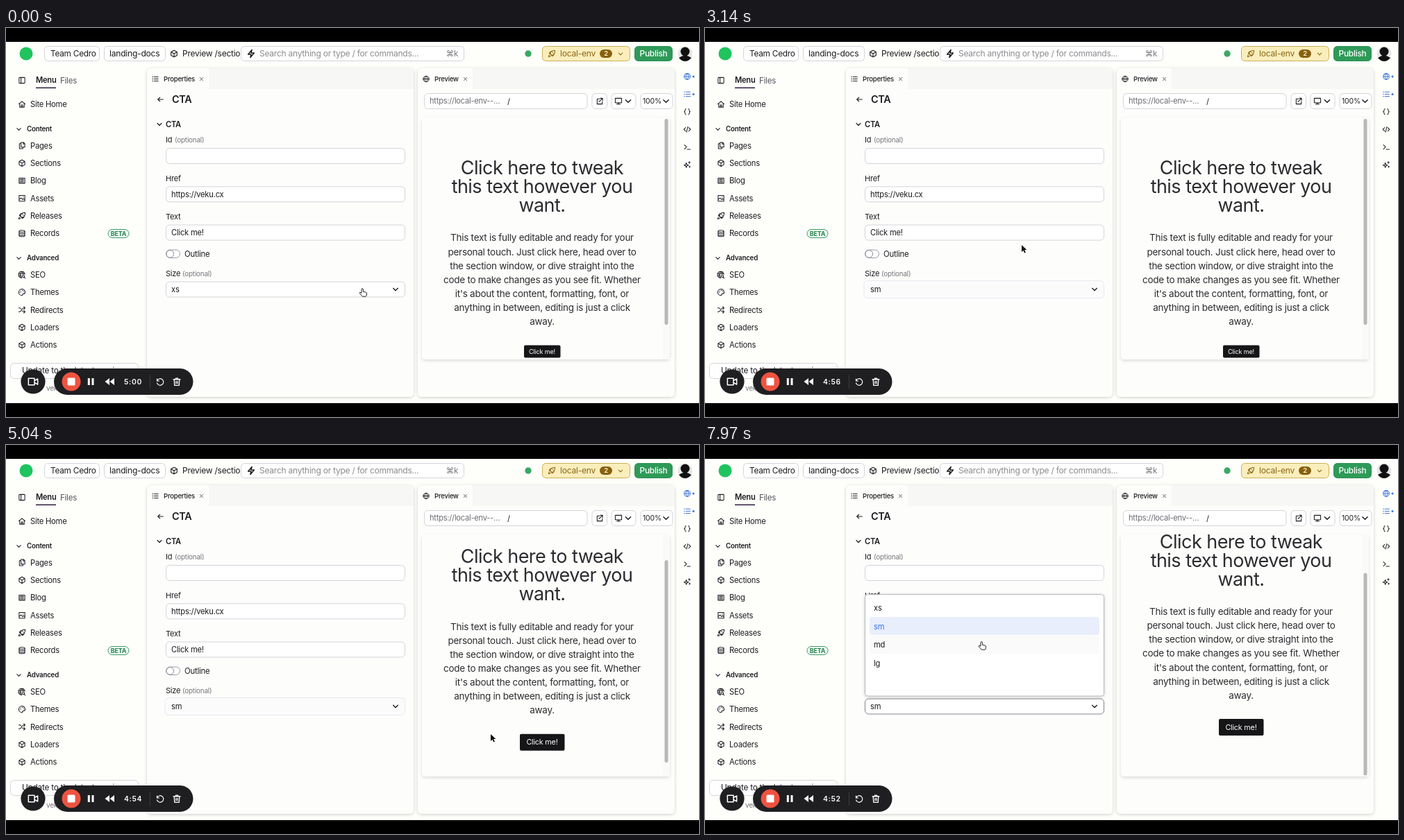
Animation of 998x561 px, one loop 8000 ms. Source, as an HTML page:

```html
<!DOCTYPE html>
<html lang="en">
<head>
<meta charset="utf-8">
<title>Button size settings</title>
<style>
  html, body { margin: 0; width: 100%; height: 100%; overflow: hidden; background: #000; }
  svg { display: block; width: 998px; height: 561px; }
  text { font-family: Inter, "Open Sans", sans-serif; letter-spacing: -.02em; white-space: pre; }
  .clock { letter-spacing: .06em; }
</style>
</head>
<body>
<svg id="stage" viewBox="0 0 998 561" xmlns="http://www.w3.org/2000/svg"></svg>
<script>
const INK = '#1c1c20', GRAY = '#75757c', LINE = '#d3d4da', BLUE = '#3a72e0', DARK = '#1f1e21';
const PAPER = '#fefefb', PANEL = '#fdfdfb';
const LOOP = 8000;

// Line icons on a 24 x 24 grid
const ICONS = {
  cube: 'M12 2l9 5v10l-9 5-9-5V7zM3 7l9 5 9-5M12 12v10',
  globe: 'M2 12a10 10 0 1 0 20 0a10 10 0 1 0-20 0M2 12h20M12 2c-6 6-6 14 0 20c6-6 6-14 0-20',
  panel: 'M5 3h14a2 2 0 0 1 2 2v14a2 2 0 0 1-2 2H5a2 2 0 0 1-2-2V5a2 2 0 0 1 2-2zM9 3v18',
  home: 'M2 11l10-8 10 8M5 9v12h14V9M10 21v-7h4v7',
  pages: 'M9 2h8l4 4v11H9zM16 2v5h5M9 6H4v16h11v-5',
  blog: 'M3 4h18v16H3zM7 8h10M7 12h10M7 16h10M3 8h1M3 12h1M3 16h1',
  image: 'M3 3h18v18H3zM3 16l6-5 5 5 3-3 4 4M15 8h1',
  rocket: 'M9 15l-4-4c3-6 9-9 17-9 0 8-3 14-9 17zM9 11H4l3-5h5M13 15v5l5-3v-5M5 16c-3 1-3 6-3 6s5 0 6-3M15 8v1',
  data: 'M3 5c0-4 18-4 18 0s-18 4-18 0v14c0 4 18 4 18 0V5M3 10c0 4 18 4 18 0M3 15c0 4 18 4 18 0',
  seo: 'M21 10a10 10 0 1 0-10 12M2 9h19M2 15h8M12 2c-6 6-6 14-1 20M12 2c3 3 4 5 4 8M13 17a3.5 3.5 0 1 0 7 0a3.5 3.5 0 1 0-7 0M19 20l3 3',
  palette: 'M12 2a10 10 0 0 0 0 20c3 0 2-3 2-4 0-3 8 1 8-6 0-6-5-10-10-10zM7 12h.5M8 8h.5M13 6h.5M17 9h.5',
  shuffle: 'M2 18h3c5 0 7-12 12-12h5M18 2l4 4-4 4M2 6h3c2 0 3 1 4 3M13 15c1 2 2 3 4 3h5M18 14l4 4-4 4',
  down: 'M4 8l8 8 8-8', back: 'M21 12H3M10 5l-7 7 7 7', close: 'M5 5l14 14M19 5L5 19',
  list: 'M8 5h14M8 12h14M8 19h14M2 5h2M2 12h2M2 19h2',
  zap: 'M14 2L4 14h8l-2 8 10-12h-8z',
  external: 'M14 3h7v7M21 3L10 14M11 5H4v16h16v-8',
  monitor: 'M2 3h20v14H2zM12 17v4M7 21h10',
  braces: 'M8 3C2 3 8 12 2 12c6 0 0 9 6 9M16 3c6 0 0 9 6 9-6 0 0 9-6 9',
  code: 'M7 6l-6 6 6 6M17 6l6 6-6 6M14 3l-4 18', terminal: 'M3 5l7 7-7 7M12 20h10',
  sparkles: 'M9 6l2 6 6 2-6 2-2 6-2-6-6-2 6-2zM19 2v6M16 5h6M20 17v4M18 19h4',
  camera: 'M2 5h13v14H2zM15 10l7-4v12l-7-4',
  undo: 'M3 4v6h6M3 10a9.5 9.5 0 1 1 0 6',
  trash: 'M3 6h18M9 6V3h6v3M5 6l1 16h12l1-16M10 11v6M14 11v6'
};

const icon = (name, x, y, size = 11, color = INK, weight = 2.3) =>
  `<path d="${ICONS[name]}" transform="translate(${x - size / 2} ${y - size / 2}) scale(${size / 24})"
    fill="none" stroke="${color}" stroke-width="${weight}" stroke-linejoin="round" stroke-linecap="round"/>`;

const chevron = (x, y, size, color = INK) => icon('down', x, y, size, color, 3.2);

// y is the vertical middle of the line
const text = (x, y, str, size = 11.2, o = {}) =>
  `<text x="${x}" y="${y + size * .36}" font-size="${size}" fill="${o.fill || INK}"
    font-weight="${o.weight || 400}" text-anchor="${o.anchor || 'start'}" ${o.attr || ''}>${str}</text>`;

const box = (x1, y1, x2, y2, r = 5, fill = '#fff', stroke = LINE, attr = '') =>
  `<rect x="${x1}" y="${y1}" width="${x2 - x1}" height="${y2 - y1}" rx="${r}" fill="${fill}" stroke="${stroke}" ${attr}/>`;

const dot = (x, y, r, fill) => `<circle cx="${x}" cy="${y}" r="${r}" fill="${fill}"/>`;
const bold = { weight: 600 }, medium = { weight: 500 };

function topBar() {
  return dot(29, 37, 9.5, '#1fc45f') +
    box(55.5, 26.5, 134.5, 47.5) + text(64, 37, 'Team Cedro', 11.8) +
    box(141.5, 26.5, 229.5, 47.5) + text(149, 37, 'landing-docs', 12.1) +
    icon('cube', 242, 37, 11.5) + text(254, 37, 'Preview /section', 12) +
    box(338.5, 26.5, 659.5, 47.5) + icon('zap', 353, 37, 13, INK, 2.8) +
    text(365, 37, 'Search anything or type / for commands...', 12, { fill: '#8b8b90' }) +
    text(651, 37, '⌘k', 11.5, { fill: GRAY, anchor: 'end' }) +
    dot(752, 37, 4.7, '#3aa865') +
    box(772.5, 26.5, 898.5, 47.5, 5, '#fbeebd', '#cbb04f') + icon('rocket', 786, 37, 11, '#8a6714') +
    text(798, 37, 'local-env', 12.1, { fill: '#8a6714' }) +
    box(855, 31, 873, 43, 6, '#86610f', 'none') +
    text(864, 37, '2', 9.5, { fill: '#fff3cd', anchor: 'middle', weight: 600 }) +
    chevron(885, 37.5, 8, '#8a6714') +
    box(905.5, 26.5, 959.5, 47.5, 5, '#2e9a58', '#2b9153') +
    text(932.5, 37, 'Publish', 11.9, { fill: '#fff', anchor: 'middle', weight: 500 }) +
    dot(978, 37, 10.5, '#e6e6e8') + dot(978, 34, 6.5, '#111') +
    '<path d="M969 43q9-7 18 0q-4 5-9 5t-9-5z" fill="#111"/>';
}

function sidebar() {
  const content = [['pages', 'Pages'], ['cube', 'Sections'], ['blog', 'Blog'], ['image', 'Assets'], ['rocket', 'Releases'], ['data', 'Records']];
  const advanced = [['seo', 'SEO'], ['palette', 'Themes'], ['shuffle', 'Redirects'], ['cube', 'Loaders'], ['cube', 'Actions']];
  const group = (items, top) => items.map(([name, label], i) =>
    icon(name, 23, top + i * 25.35) + text(35, top + i * 25.35, label)).join('');
  return icon('panel', 23, 75.5) + text(43, 75.5, 'Menu', 11.1, bold) + text(78, 75.5, 'Files', 11.5, { fill: '#55555c' }) +
    '<path d="M43 86.3h29" stroke="#2c1b3d" stroke-width="1.5"/>' +
    icon('home', 23, 110) + text(35, 110, 'Site Home') +
    chevron(18.5, 146, 8) + text(30, 146, 'Content', 9.7, bold) + group(content, 169.5) +
    box(147, 290.5, 177, 302.5, 6, '#f0faf4', '#3c9b66') +
    text(162, 296.5, 'BETA', 9, { fill: '#2a8653', anchor: 'middle', weight: 700 }) +
    chevron(18.5, 332, 8) + text(30, 332, 'Advanced', 9.7, bold) + group(advanced, 355.8) +
    box(6.5, 483.5, 190.5, 505.5, 5) + text(23, 494, 'Update to the latest version', 11.8) +
    text(58, 519, 'veku', 10, { fill: GRAY });
}

function panel(x1, x2, tabEnd, name, label) {
  return box(x1, 58, x2, 532, 6, PANEL, 'none', 'filter="url(#shadow)"') +
    `<path d="M${tabEnd} 58H${x2 - 6}q6 0 6 6V88H${tabEnd}z" fill="#f7f7f6"/>` +
    icon(name, x1 + 12, 73.5, 10, INK, 2.4) + text(x1 + 24, 73.5, label, 9.5, medium) +
    icon('close', tabEnd - 10.5, 73.5, 7, '#45454c', 3);
}

function propertyForm() {
  const label = (y, name, optionalX) => text(230, y, name, 11) +
    (optionalX ? text(optionalX, y, '(optional)', 9.9, { fill: GRAY }) : '');
  const field = (y, value) => box(230.5, y - 11, 574.5, y + 11, 5, '#fff', LINE) + text(238, y, value, 11.2);
  return icon('back', 222.5, 103, 10, INK, 2.8) + text(239, 102.5, 'CTA', 14.4, bold) +
    chevron(221, 139, 9) + text(230, 139, 'CTA', 11.1, bold) +
    label(161.5, 'Id', 243) + field(184.5, '') +
    label(217, 'Href') + field(239.8, 'https://veku.cx') +
    label(272, 'Text') + field(295, 'Click me!') +
    box(230.5, 320, 250.5, 331.5, 5.8, '#fff', '#9b9ba6') +
    '<circle cx="236.3" cy="325.8" r="5.3" fill="#fff" stroke="#8b8b98"/>' +
    text(257, 325.5, 'Outline', 11.4) + label(354, 'Size', 254);
}

function previewFrame() {
  return box(602.5, 94.5, 837, 116.5) + text(610, 105.5, 'https://local-env--…', 11.1, { fill: '#6c6c72' }) +
    text(722, 105.5, '/', 11.2) +
    box(844, 94.5, 865.5, 116.5) + icon('external', 855, 105.5) +
    box(872, 94.5, 907, 116.5) + icon('monitor', 882, 105.5) + chevron(896, 105.5, 11) +
    box(914, 94.5, 960, 116.5) + text(917, 105.5, '100%', 10.5) + chevron(950.5, 105.5, 11) +
    box(599, 129, 956, 478, 5, PANEL, 'none', 'filter="url(#soft)"') +
    '<path d="M946 129V478H956V129z" fill="#fafaf8"/>';
}

function previewPage() {
  const heading = ['Click here to tweak', 'this text however you', 'want.'];
  const copy = ['This text is fully editable and ready for your', 'personal touch. Just click here, head over to',
    'the section window, or dive straight into the', 'code to make changes as you see fit. Whether',
    "it's about the content, formatting, font, or", 'anything in between, editing is just a click', 'away.'];
  const centred = { anchor: 'middle', fill: '#2c2c30' };
  return heading.map((line, i) => text(772, 201.6 + i * 27, line, 27, centred)).join('') +
    copy.map((line, i) => text(772, 302.6 + i * 20.15, line, 13.5, centred)).join('');
}

function rail() {
  return ['globe', 'list', 'braces', 'code', 'terminal', 'sparkles'].map((name, i) =>
    icon(name, 981, 70 + i * 25.4, 10.5, i < 2 ? BLUE : INK) +
    (i < 2 ? dot(990, 70 + i * 25.4, 1.5, BLUE) : '')).join('');
}

function recorder() {
  return dot(39, 510, 17.6, DARK) + icon('camera', 39, 510, 16, '#fff') +
    box(69, 491, 269.5, 529, 19, DARK, 'none') +
    dot(94, 510, 13.5, '#ee5340') + box(88.5, 504.5, 99.5, 515.5, 1.5, '#fff', 'none') +
    '<path d="M117.800 505h3v10h-3zM123.500 505h3v10h-3zM149 505v10l-6.500-5zM156 505v10l-6.500-5z" fill="#fff"/>' +
    text(170, 510, '', 10.4, { fill: '#fff', weight: 600, attr: 'id="clock" class="clock"' }) +
    '<path d="M207.500 500v20" stroke="#3b3a3e"/>' +
    icon('undo', 222, 510, 12, '#fff', 2.4) + icon('trash', 246, 510, 13, '#fff', 2.4);
}

const sizes = ['xs', 'sm', 'md', 'lg'], ROW = 26.8;
const rowTop = i => 221.3 + i * ROW;

function menu() {
  return '<g id="menu">' + box(230.5, 215.5, 574.5, 362, 4, '#fff', '#b9bac2', 'filter="url(#shadow)"') +
    sizes.map((s, i) => `<g class="row">${box(237, rowTop(i), 568, rowTop(i) + 26, 4, 'none', 'none')}` +
      text(243, rowTop(i) + 13.5, s) + '</g>').join('') + '</g>';
}

const $ = id => document.getElementById(id);
const shadow = (id, dy, opacity) => `<filter id="${id}" x="-10%" y="-10%" width="120%" height="120%">
  <feDropShadow dx="0" dy="${dy}" stdDeviation="2" flood-opacity="${opacity}"/></filter>`;

$('stage').innerHTML = `<defs>${shadow('shadow', 1, .2)}${shadow('soft', 2, .13)}
  <clipPath id="view"><rect x="599" y="128" width="357" height="350" rx="5"/></clipPath></defs>` +
  `<path d="M0 20H998V541H0z" fill="${PAPER}"/>` + topBar() + sidebar() +
  panel(203, 587, 292, 'list', 'Properties') + panel(593, 963, 672, 'globe', 'Preview') +
  propertyForm() + box(0, 0, 0, 0, 5, '#fff', LINE, 'id="select"') +
  text(238, 377, '', 11.2, { attr: 'id="value"' }) + chevron(561, 377, 10) +
  previewFrame() +
  `<g clip-path="url(#view)"><g id="page">${previewPage()}
    ${box(0, 457.5, 0, 457.5, 2, '#161618', 'none', 'id="button"')}
    <text id="buttonText" x="772" text-anchor="middle" fill="#fff">Click me!</text></g></g>` +
  box(948.5, 131, 953.5, 428, 2.5, '#b8b8ba', 'none', 'id="thumb"') +
  rail() + menu() + recorder() +
  `<g id="cursor">
    <path id="hand" d="M1 1.200q0-1.500 1.200-1.500t1.200 1.500v3l4 1q1.500.500 1.200 2l-.600 3q-.400 1-1 1h-4q-1 0-1.600-1l-3-3.500q-.600-1.300.600-1.500l2 1z" fill="#fff" stroke="#222"/>
    <path id="arrow" d="M0 0v10l2.400-2.200 1.700 3.800 1.800-.8-1.700-3.700h3.200z" fill="#111" stroke="#fff" stroke-width=".8" paint-order="stroke"/></g>`;
const rows = [...document.querySelectorAll('.row')];

// time, x, y of the pointer tip
const PATH = [[0, 511, 376], [1000, 511, 376], [1680, 424, 284], [1780, 424, 284], [1970, 424, 276],
  [2370, 430, 257], [2640, 430, 257], [3140, 456, 313], [3440, 470, 330], [4240, 562, 445],
  [4620, 700, 420], [5040, 698, 417], [5330, 697, 417], [5970, 449, 393], [6200, 439, 381],
  [7000, 439, 381], [7570, 396, 284], [LOOP, 396, 284]];

const ease = (t, from, to) => {
  const u = Math.min(1, Math.max(0, (t - from) / (to - from)));
  return u * u * (3 - 2 * u);
};

function pointerAt(t) {
  const i = PATH.findIndex(p => p[0] > t);
  const [t0, x0, y0] = PATH[i - 1], [t1, x1, y1] = PATH[i], k = ease(t, t0, t1);
  return [x0 + (x1 - x0) * k, y0 + (y1 - y0) * k];
}

function set(el, attrs) {
  for (const name in attrs) el.setAttribute(name, attrs[name]);
}

function draw(t) {
  const picked = t >= 2640 ? 1 : 0;
  const open = (t >= 900 && t < 2640) || t >= 6800;
  const large = t >= 3800;
  const [x, y] = pointerAt(t);

  set($('menu'), { visibility: open ? 'visible' : 'hidden' });
  rows.forEach((row, i) => {
    const hover = open && y >= rowTop(i) && y < rowTop(i) + ROW;
    set(row.children[0], { fill: i === picked ? '#e8eefc' : hover ? '#fafafb' : 'none' });
    set(row.children[1], { fill: i === picked ? BLUE : INK });
  });

  const ring = picked && !open;
  const pad = ring ? 1.5 : 0;
  set($('select'), {
    x: 230.5 - pad, y: 366 - pad, width: 344 + pad, height: 22 + pad * 2,
    fill: ring ? '#fbfbfc' : '#fff', stroke: open ? '#85858e' : ring ? '#e9e9f2' : LINE
  });
  $('value').textContent = sizes[picked];

  const scroll = 62.5 * ease(t, 4600, 5330);
  set($('page'), { transform: `translate(0 ${-scroll})` });
  set($('thumb'), { y: 131 + scroll * .855, height: large ? 292 : 297 });
  set($('button'), large ? { x: 740, width: 64.5, height: 24 } : { x: 746, width: 52.5, height: 18 });
  set($('buttonText'), large ? { y: 473, 'font-size': 10.8 } : { y: 469.6, 'font-size': 9.1 });

  const left = 299 + (t < 40 ? 1 : 0) - Math.floor(t / 1000);
  $('clock').textContent = `${Math.floor(left / 60)}:${String(left % 60).padStart(2, '0')}`;

  const overControl = x > 228 && x < 575 && y < 390 && y > (open ? 215 : 364);
  set($('cursor'), { transform: `translate(${x} ${y})` });
  set($('hand'), { visibility: overControl ? 'visible' : 'hidden' });
  set($('arrow'), { visibility: overControl ? 'hidden' : 'visible' });
}

const start = performance.now();
function tick() {
  draw((performance.now() - start) % LOOP);
  requestAnimationFrame(tick);
}
tick();
</script>
</body>
</html>
```
